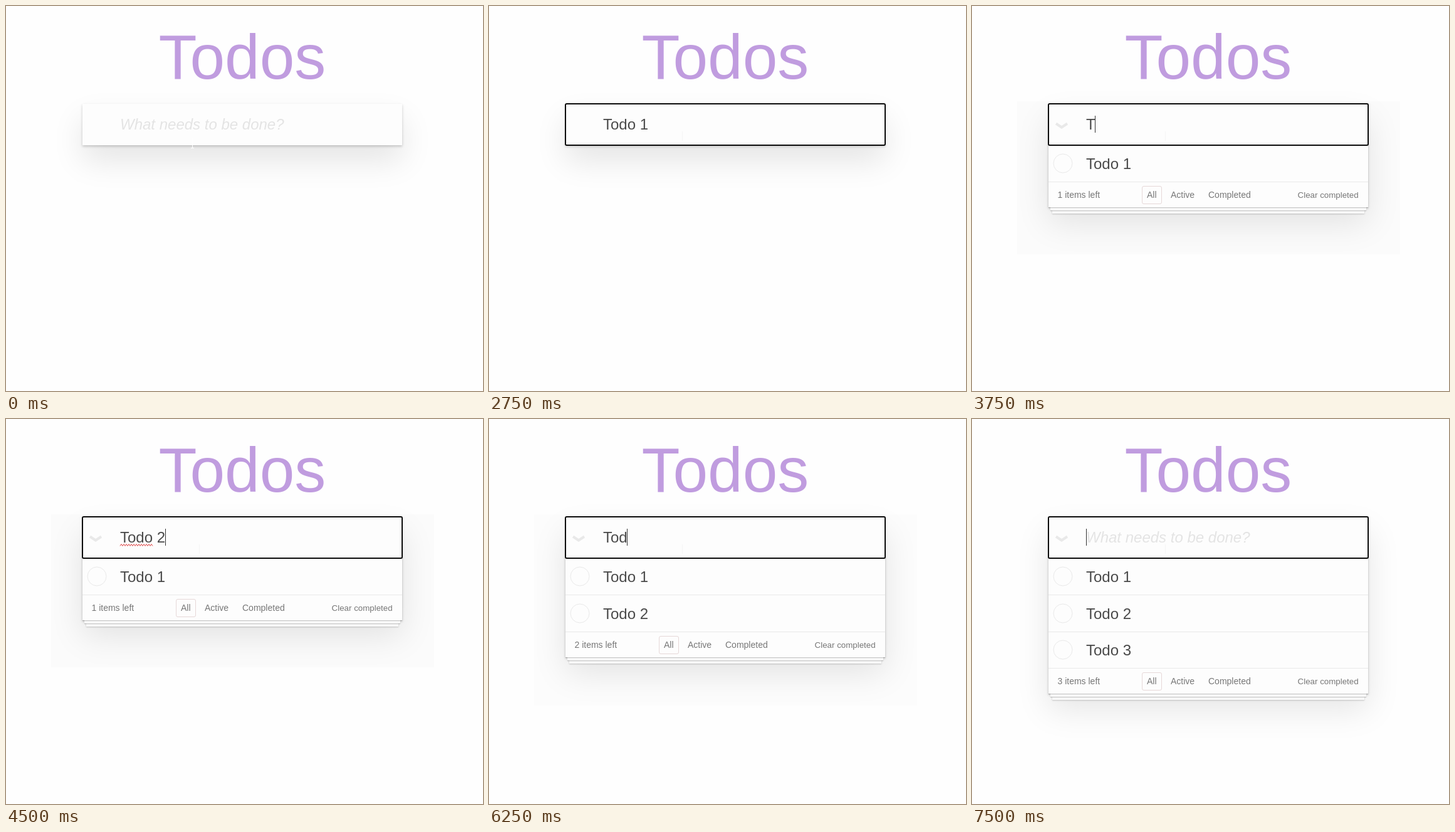
Write an HTML page that moves like this. It is 761 px wide and 614 px high and loops after 8000 ms.

```html
<!DOCTYPE html>
<html lang="en">
<head>
<meta charset="utf-8">
<title>Todos</title>
<style>
html, body { margin: 0; width: 100%; height: 100%; overflow: hidden; background: #fefefe; }
body { position: relative; }
#plate, #card, svg { position: absolute; }
#plate { left: 72px; top: 152px; width: 611px; }
#card {
  left: 122px; top: 156px; width: 510px; background: #fdfdfd;
  --lift: 0 2px 4px rgba(0,0,0,.2), 0 25px 50px rgba(0,0,0,.1);
  box-shadow: var(--lift);
}
#card.stack {
  box-shadow: 0 1px 1px rgba(0,0,0,.2),
    0 8px 0 -3px #f8f8f8, 0 9px 1px -3px rgba(0,0,0,.2),
    0 16px 0 -6px #f8f8f8, 0 17px 2px -6px rgba(0,0,0,.2), var(--lift);
}
svg { left: 0; top: 0; }
text { font: 24px "Liberation Sans", Arial, sans-serif; fill: #4a4a4a; white-space: pre; }
.title { font-size: 100px; fill: #c09cdf; }
.hint { font-style: italic; fill: #e4e4e4; }
.busy { fill: #a3a3a3; }
.small { font-size: 14px; fill: #777; }
.clear { font-size: 13.333px; fill: #777; }
.line { fill: none; stroke: #e9e9e9; }
</style>
</head>
<body>
<div id="plate"></div>
<div id="card"></div>
<svg id="view" width="761" height="614"></svg>
<script>
const LOOP = 8000, ROW = 58.5, LIST_TOP = 222;
const $ = id => document.getElementById(id);

const empty = { text: '', caret: 182, focus: true, wavy: false, busy: 0, pointer: 'beam' };
const blur = { caret: 0, focus: false, wavy: false, busy: 1 };

// Each step changes only the listed properties.
const steps = [
  [0, { text: '', caret: 0, focus: false, wavy: false, items: 0, busy: 0, pointer: 'low' }],
  [250, { pointer: '' }],
  [500, empty],
  [1000, { caret: 0 }],
  [1500, { text: 'T', caret: 196 }],
  [1750, { text: 'Tod', caret: 220 }],
  [2000, { text: 'Todo ', caret: 240, wavy: true }],
  [2250, { text: 'Todo 1', caret: 254, wavy: false }],
  [2750, { caret: 0 }],
  [3000, { ...blur, items: 1 }],
  [3250, empty],
  [3750, { text: 'T', caret: 196 }],
  [4000, { text: 'Tod', caret: 220 }],
  [4250, { text: 'Todo', caret: 234 }],
  [4500, { text: 'Todo 2', caret: 254, wavy: true }],
  [5000, { ...blur, items: 2, pointer: 'arrow' }],
  [5250, empty],
  [5750, { text: 'T', caret: 196 }],
  [6250, { text: 'Tod', caret: 220 }],
  [6500, { text: 'Todo', caret: 234 }],
  [6750, { text: 'Todo ', caret: 240, wavy: true }],
  [7000, { text: 'Todo 3', caret: 254, wavy: false }],
  [7500, { ...empty, items: 3 }]
];

const pointers = {
  '': '',
  low: '<path d="M297.5 210v16M295 226.5h5" stroke="#fff" fill="none"/>',
  beam: '<path d="M308.5 200v15" stroke="#f5f5f5"/>',
  arrow: '<path d="M298.5 198v16.5l3.8-3.6 2.6 6 2.6-1.1-2.6-5.9h5.2z" fill="#fff" stroke="#000" stroke-width="1.2"/>'
};
// Spinner poses, one per row.
const arcs = ['M-11.5 1A11.5 11.5 0 0 1 10-6', 'M-4-10.5A11.5 11.5 0 0 0 8 9'];

const label = (x, y, str, cls = '') => `<text x="${x}" y="${y}" class="${cls}">${str}</text>`;
const rule = y => `<path class="line" d="M122 ${Math.floor(y) + .5}h510"/>`;

function row(i, busy) {
  const top = LIST_TOP + i * ROW, mid = Math.floor(top + 29.5);
  return (busy ? `<rect x="122" y="${top + 1}" width="510" height="57" fill="#fafafa"/>` : '') +
    rule(top) +
    `<circle class="line" cx="145" cy="${mid}" r="15"/>` +
    label(182, mid + 9, `Todo ${i + 1}`, busy ? 'busy' : '') +
    (busy ? `<path class="line" stroke-width="2" transform="translate(376 ${mid})" d="${arcs[i]}"/>` : '');
}

function footer(items, left) {
  const top = Math.floor(LIST_TOP + items * ROW), y = top + 26;
  return rule(top) +
    `<rect x="271.5" y="${top + 7.5}" width="31" height="28" rx="2.5" fill="none" stroke="#e6d8d8"/>` +
    label(136.5, y, `${left} items left`, 'small') +
    label(279, y, 'All', 'small') +
    label(317, y, 'Active', 'small') +
    label(377, y, 'Completed', 'small') +
    label(519.6, y, 'Clear completed', 'clear');
}

function draw(s) {
  const left = s.items - s.busy;
  const bottom = s.items ? Math.floor(LIST_TOP + s.items * ROW) + 41 : LIST_TOP;
  $('card').style.height = bottom - 156 + 'px';
  $('card').className = s.items ? 'stack' : '';
  $('plate').style.height = [0, 244, 305, 0][s.items] + 'px';
  $('plate').style.background = s.items === 1 ? '#fbfbfb' : '#fcfcfc';

  let out = label(243.5, 116, 'Todos', 'title');
  for (let i = 0; i < s.items; i++) out += row(i, s.busy && i === s.items - 1);
  if (s.items) out += footer(s.items, left);
  if (left) out += '<path class="line" stroke-width="4" d="M134 187.5L143 193.5 152 187.5"/>';
  out += s.text ? label(182, 197, s.text) : label(182, 197, 'What needs to be done?', 'hint');
  if (s.wavy) out += `<path d="M182 202.5${'l2-3 2 3'.repeat(13)}" fill="none" stroke="#e04848"/>`;
  if (s.focus) out += '<rect x="122" y="156" width="510" height="66" rx="2" fill="none" stroke="#0c0c0c" stroke-width="2"/>';
  if (s.caret) out += `<rect x="${s.caret}" y="175" width="1" height="27" fill="#333"/>`;
  $('view').innerHTML = out + pointers[s.pointer];
}

let shown = -1;
function tick() {
  const t = performance.now() % LOOP;
  const past = steps.filter(([at]) => at <= t);
  if (past.length !== shown) {
    shown = past.length;
    draw(Object.assign({}, ...past.map(([, change]) => change)));
  }
  requestAnimationFrame(tick);
}
tick();
</script>
</body>
</html>
```
